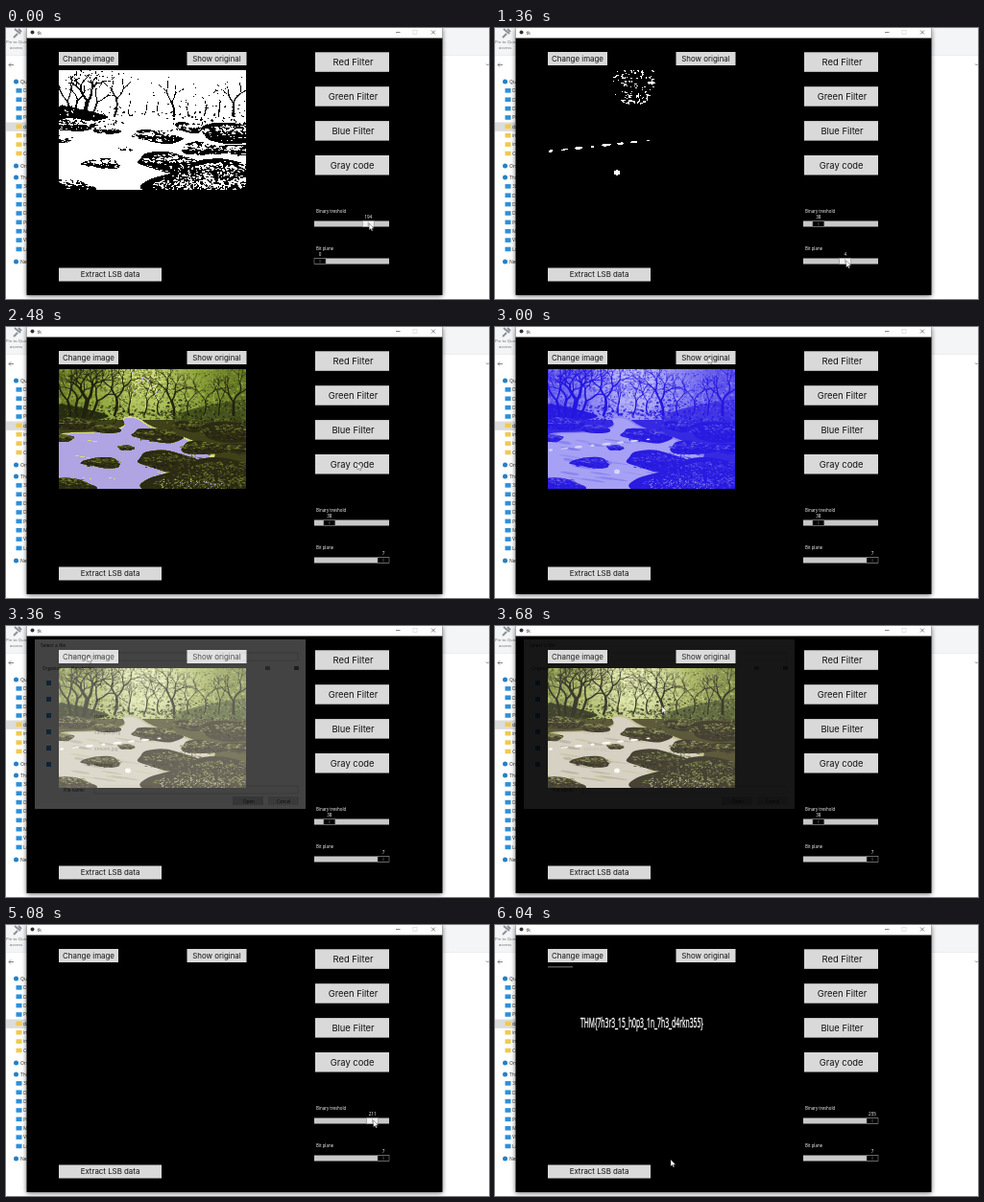
Animation, 503 px wide and 283 px high, one loop 6080 ms. Source, as an HTML page with a canvas:

```html
<!DOCTYPE html>
<html lang="en">
<head>
<meta charset="utf-8">
<title>Image filter tool</title>
<style>
  html, body { margin: 0; width: 503px; height: 283px; overflow: hidden; background: #fff; }
  svg, canvas { position: absolute; left: 0; top: 0; }
  canvas { left: 55px; top: 44px; }
  text { font-family: "Open Sans", "Noto Sans", sans-serif; }
  .window { filter: drop-shadow(0 1px 2.5px #0009); }
  .btn { font-family: Inter, sans-serif; fill: #111; text-anchor: middle; }
  .small { font-size: 4.4px; fill: #fff; }
  .value { font-size: 4.6px; fill: #fff; text-anchor: middle; }
</style>
</head>
<body>
<svg id="ui" width="503" height="283"></svg>
<canvas id="photo" width="195" height="125"></canvas>
<svg id="top" width="503" height="283"></svg>
<script>
const LOOP = 6080, W = 195, H = 125;
const $ = id => document.getElementById(id);
const clamp = v => Math.min(1, Math.max(0, v));
const lerp = (a, b, k) => a + (b - a) * k;

// ---- Window and controls ----
const rect = (x, y, w, h, fill, more = "") =>
  `<rect x="${x}" y="${y}" width="${w}" height="${h}" fill="${fill}" ${more}/>`;
const box = (x, y, w, h) => rect(x, y, w, h, "none", 'stroke="#bbb" stroke-width=".6"');
const label = (x, y, size, str, fill = "#222") =>
  `<text x="${x}" y="${y}" font-size="${size}" fill="${fill}">${str}</text>`;
const button = (x, y, w, h, size, str, shift = 0) => rect(x, y, w, h, "#d9d9d9") +
  `<text class="btn" x="${x + w / 2 + shift}" y="${y + h / 2 + size * .35}" font-size="${size}">${str}</text>`;

const ROW = 9.37;
function sidebar() {
  const places = ["Desktop", "Downloads", "Documents", "Pictures"];
  const groups = [
    [56, "Quick", [...places, "data", "images", "input", "Code"]],
    [144, "Online", []],
    [156, "This", ["3D", ...places, "Music", "Videos", "Local"]],
    [244, "Network", []]
  ];
  const item = (y, str) =>
    rect(10.5, y - 2.3, 6, 4.6, /^[a-zC]/.test(str) ? "#f0c94f" : "#2f8fd8") + label(18, y + 1.8, 5, str);
  return rect(0, 98.5, 21, ROW, "#dcdcdc") + groups.map(([y, head, items]) =>
    `<circle cx="10.5" cy="${y}" r="2.5" fill="#2580c4"/>` + label(15, y + 1.8, 5, head) +
    items.map((s, i) => item(y + ROW * (i + 1), s)).join("")).join("");
}

function slider(id, y, name) {
  return `<text class="small" x="323" y="${y - 12}">${name}</text>` +
    rect(321, y - 3, 78, 6, "#c8c8c8") +
    `<g id="${id}"><rect x="-6" y="${y - 3}" width="12" height="6" stroke="#8a8a8a" stroke-width=".6"/>
    <path d="M0 ${y - 2}v4" stroke="#777" stroke-width=".6"/>
    <text class="value" y="${y - 5.2}"></text></g>`;
}

$("ui").innerHTML =
  rect(0, 0, 503, 28, "#f4f5f6") + rect(0, 28, 503, .6, "#e2e2e2") +
  `<path d="M9 1l6 5M13 1l3 3M12 6l-4 4" stroke="#8b9299" stroke-width="2"/>` +
  label(0, 16.3, 4.3, "Pin to Quick", "#666") + label(4, 21.5, 4.3, "access", "#666") +
  `<path d="M8 38.5H3M5 36.5l-2 2 2 2M500 37.5l1.5 1.5 1.5-1.5" fill="none" stroke="#555" stroke-width=".7"/>` +
  sidebar() +
  `<g class="window">${rect(21.5, 0, 433, 279, "#000")}</g>` + rect(21.5, 0, 433, 10.5, "#fff") +
  `<circle cx="27.5" cy="4.5" r="2" fill="#333"/>` + label(32.5, 6.5, 4.8, "tk") +
  `<path d="M406 4.5h4.5M443 2.5l4 4M447 2.5l-4 4" stroke="#333" stroke-width=".6"/>
   <rect x="424" y="2.5" width="4" height="4" fill="none" stroke="#d0d0d0" stroke-width=".6"/>` +
  button(55, 25, 62, 14, 7.9, "Change image") + button(188.5, 25, 62, 14, 7.9, "Show original") +
  button(55, 250.5, 107, 14, 7.9, "Extract LSB data") +
  ["Red Filter", "Green Filter", "Blue Filter", "Gray code"]
    .map((s, i) => button(322, 25.3 + i * 35.9, 77, 20.5, 9.4, s, i < 3 ? 1 : .2)).join("") +
  slider("thr", 204.5, "Binary treshold") + slider("bit", 243.5, "Bit plane");

const files = ["dark.png", "forest.png", "river.png", "sample.png", "stream.jpg", "test.png"];
$("top").innerHTML =
  `<g id="flag">${rect(55, 43.4, 26, .9, "#8c8c8c")}
   <text transform="translate(89 106.5) scale(.485 1)" font-size="14" fill="#fff"
     stroke="#fff" stroke-width=".4">THM{7h3r3_15_h0p3_1n_7h3_d4rkn355}</text></g>` +
  `<g id="dialog">${rect(30, 14, 282, 177, "#fff")}${label(36, 22, 5, "Select a file")}
   ${box(62, 28, 150, 8)}${label(66, 34, 4.6, "This PC &#8250; Pictures")}${box(220, 28, 84, 8)}
   ${label(38, 46, 4.6, "Organize")}${label(68, 46, 4.6, "New folder")}
   ${rect(300, 42, 5, 4, "#777")}${rect(270, 42, 5, 4, "#999")}
   ${files.map((s, i) => rect(42, 57 + i * 17, 5, 5, "#2f8fd8") + label(92, 62 + i * 17, 5, s)).join("")}
   ${label(60, 173, 4.6, "File name:")}${box(92, 167, 212, 8)}
   ${rect(236, 178, 32, 9, "#ccc")}${label(247, 184.5, 4.6, "Open")}
   ${rect(273, 178, 32, 9, "#ddd")}${label(282, 184.5, 4.6, "Cancel")}</g>` +
  `<path id="cursor" d="M0 0V7L1.6 5.6 2.7 8 3.8 7.5 2.7 5.2H5Z" fill="#fff" stroke="#333" stroke-width=".4"/>`;

// ---- Forest stream scene ----
let seed = 7;
function rnd(a = 0, b = 1) {
  seed = (seed * 1664525 + 1013904223) >>> 0;
  return lerp(a, b, seed / 4294967296);
}

function paintScene(c) {
  const oval = (x, y, rx, ry, fill, tilt = 0) => {
    c.fillStyle = fill;
    c.beginPath();
    c.ellipse(x, y, rx, ry, tilt, 0, 7);
    c.fill();
  };
  // Closed curve through the middles of the given points
  const shape = (pts, fill) => {
    const n = pts.length;
    const mid = i => pts[i % n].map((v, j) => (v + pts[(i + 1) % n][j]) / 2);
    c.beginPath();
    c.moveTo(...mid(0));
    for (let i = 1; i <= n; i++) c.quadraticCurveTo(...pts[i % n], ...mid(i));
    c.fillStyle = fill;
    c.fill();
  };
  const specks = (n, x0, y0, x1, y1, size, fills) => {
    for (let i = 0; i < n; i++)
      oval(rnd(x0, x1), rnd(y0, y1), rnd(.4, size), rnd(.3, size * .6), fills[i % fills.length], rnd(-.8, .8));
  };
  const branch = (x, y, angle, len, width) => {
    if (width < .3) return;
    const bend = angle + rnd(-.5, .5);
    const nx = x + Math.cos(angle) * len, ny = y + Math.sin(angle) * len;
    c.lineWidth = width;
    c.beginPath();
    c.moveTo(x, y);
    c.quadraticCurveTo(x + Math.cos(bend) * len * .5, y + Math.sin(bend) * len * .5, nx, ny);
    c.stroke();
    branch(nx, ny, angle + rnd(.1, .8), len * rnd(.6, .9), width * .66);
    branch(nx, ny, angle - rnd(.1, .8), len * rnd(.6, .9), width * .66);
  };

  // Woods with light in the middle
  const woods = c.createRadialGradient(90, 12, 4, 92, 20, 115);
  woods.addColorStop(0, "#f3f5c4");
  woods.addColorStop(.2, "#d9dfa0");
  woods.addColorStop(.5, "#a3b057");
  woods.addColorStop(1, "#66742f");
  c.fillStyle = woods;
  c.fillRect(0, 0, W, H);
  specks(1500, 0, 0, W, 50, 2, ["#8fa04a88", "#c3cc7f88", "#6c7f3488", "#dde2a077"]);
  specks(500, 55, 0, 135, 30, 1.6, ["#a3ae6088", "#c6cc8a99", "#7a8a4499"]);
  specks(420, 0, 0, W, 48, 1.1, ["#3a421ecc", "#4c5827cc"]);

  // Banks
  shape([[-20, 34], [14, 38], [35, 43], [62, 51], [-20, 60]], "#2f3319");
  shape([[112, 50], [150, 38], [215, 28], [215, 66], [130, 58]], "#566030");
  c.fillStyle = "#4d4a28";
  c.fillRect(0, 53, W, H);
  specks(380, 112, 32, W, 64, 1.8, ["#2c3018", "#7d884a", "#424b24"]);
  specks(200, 0, 36, 70, 58, 1.5, ["#2b2c18", "#59623299", "#353a1e"]);
  specks(90, 58, 42, 120, 52, 2, ["#33361c", "#6d783c"]);

  // Trees
  c.strokeStyle = "#29261a";
  c.lineCap = "round";
  for (let i = 0; i < 4; i++) branch(12 + i * 7, 49, -1.75 + i * .2, 17, i === 2 ? 4.5 : 2.4);
  for (let i = 0; i < 9; i++) branch(58 + i * 15.5, 48, -1.55 + rnd(-.2, .2), rnd(13, 19), i % 4 ? 1.3 : 2.6);

  // Stream
  const water = [[64, 49], [82, 49], [95, 60], [130, 70], [168, 87], [154, 99], [106, 108],
    [98, 130], [24, 130], [-12, 112], [-12, 66], [40, 66], [72, 60]];
  shape(water, "#bebc84");
  shape(water.map(([x, y]) => [lerp(75, x, .94), lerp(90, y, .95)]), "#d2cdbc");
  for (let i = 0; i < 26; i++)
    oval(rnd(5, 125), rnd(70, 118), rnd(5, 16), rnd(.4, 1.6), i % 2 ? "#bebc84aa" : "#a9a592aa", .15);

  // Stones: x, y, half width
  const stones = [
    [14, 57, 24], [48, 62, 15], [100, 69, 25], [140, 60, 20], [178, 66, 32], [150, 83, 25], [192, 84, 22],
    [3, 72, 13], [46, 98, 20], [70, 82, 9], [118, 97, 36], [174, 104, 34], [10, 121, 26], [150, 122, 56]
  ];
  for (const [x, y, rx] of stones) {
    const ry = rx * .28, n = 11;
    const pts = Array.from({ length: n }, (_, i) => {
      const a = i * Math.PI * 2 / n, r = rnd(.8, 1.35);
      return [x + Math.cos(a) * rx * r, y + Math.sin(a) * ry * r + Math.cos(a) * rx * .07];
    });
    shape(pts, "#353020");
    for (let i = 0; i < rx * 5; i++) {
      const a = rnd(0, 6.28), r = Math.sqrt(rnd()) * .95;
      const up = Math.sin(a) < 0;
      const fills = up ? ["#77793d", "#585a2e", "#8b8f50"] : ["#27231a", "#413a22", "#555030"];
      oval(x + Math.cos(a) * rx * r, y + Math.sin(a) * ry * r, rnd(.5, 2.2), rnd(.3, .7), fills[i % 3], .15);
    }
  }
  specks(300, 125, 100, W, H, 1.2, ["#747a3c", "#2c281a", "#8b9052", "#3c3820"]);
  specks(90, 105, 115, 170, H, .7, ["#f1efcc"]);

  // Foam along the falls
  for (let i = 0; i < 8; i++) oval(3 + i * 14.5, 84.5 - i * 1.6, rnd(2, 5), rnd(.7, 1.4), "#fbfaf2", -.1);
  oval(72, 107, 3, 2.5, "#fbfaf2");
}

const ctx = $("photo").getContext("2d", { willReadFrequently: true });
paintScene(ctx);
const base = ctx.getImageData(0, 0, W, H).data;

const mono = on => on ? [255, 255, 255] : [0, 0, 0];
const tint = l => {
  const k = (l / 255) ** 1.5;
  return [25 + 195 * k, 10 + 210 * k, 222 + 30 * k];
};
const LOOKS = {
  binary: (r, g, b, l, thr) => mono(l > 255 - thr),
  plane: (r, g, b, l, n) => mono(l >> n & 1),
  gray: (r, g, b, l) => l > 145 && g - b < 42 ? [176, 164, 226]
    : l > 170 && g - b < 58 ? [214, 218, 132] : [r * .82, g * .88, b * .6],
  red: (r, g, b, l) => tint(l).reverse(),
  green: (r, g, b, l) => { const [x, y, z] = tint(l); return [x, z, y]; },
  blue: (r, g, b, l) => tint(l),
  plain: (r, g, b) => [r, g, b],
  dark: () => mono(false)
};

let shown = "";
function showPhoto(look, arg) {
  const key = look + arg;
  if (key === shown) return;
  shown = key;
  const out = ctx.createImageData(W, H);
  for (let i = 0; i < base.length; i += 4) {
    const r = base[i], g = base[i + 1], b = base[i + 2];
    const l = Math.round(r * .3 + g * .59 + b * .11);
    out.data.set(LOOKS[look](r, g, b, l, arg), i);
    out.data[i + 3] = 255;
  }
  ctx.putImageData(out, 0, 0);
}

// ---- Timeline ----
// Value at time t from [time, value] pairs, linear between them
function track(keys, t) {
  const i = keys.findIndex(k => k[0] > t);
  if (i < 0) return keys[keys.length - 1][1];
  if (i === 0) return keys[0][1];
  const [t0, a] = keys[i - 1], [t1, b] = keys[i];
  return lerp(a, b, (t - t0) / (t1 - t0));
}
const threshold = t => Math.round(track([[0, 194], [440, 38], [4060, 38], [4240, 128], [4400, 128], [5440, 255]], t));
const plane = t => Math.round(track([[760, 0], [1240, 4], [1900, 5], [2080, 7]], t));
const knob = (value, max) => 327 + 66 * value / max;

const SPOTS = {
  thr: t => [knob(threshold(t), 255) + 1, 204],
  bit: t => [knob(plane(t), 7) + 1, 243],
  red: () => [367, 36],
  green: () => [367, 72],
  blue: () => [367, 108],
  gray: () => [366, 142],
  show: () => [222, 31],
  change: () => [85, 31],
  file: () => [174, 84],
  extract: () => [183, 245]
};

// Where the pointer rests: from, until, spot
const STOPS = [
  [0, 480, "thr"], [720, 2160, "bit"], [2360, 2520, "gray"], [2600, 2660, "red"], [2720, 2780, "green"],
  [2840, 2880, "blue"], [2980, 3140, "show"], [3300, 3380, "change"], [3560, 3760, "file"],
  [4060, 5960, "thr"], [6040, LOOP, "extract"]
];
function pointer(t) {
  const i = STOPS.findIndex(s => t <= s[1]);
  const [from, , name] = STOPS[i];
  if (t >= from) return { name, at: SPOTS[name](t) };
  const [, left, last] = STOPS[i - 1];
  const a = SPOTS[last](left), b = SPOTS[name](from), k = (t - left) / (from - left);
  return { name: "", at: a.map((v, j) => lerp(v, b[j], k)) };
}

// Look of the photo until each time
const STEPS = [[1400, "binary"], [2400, "plane"], [2600, "gray"], [2720, "red"], [2840, "green"],
  [3120, "blue"], [3740, "plain"], [LOOP, "dark"]];

function setSlider(id, value, max, active) {
  const g = $(id);
  g.setAttribute("transform", `translate(${knob(value, max)} 0)`);
  g.firstChild.setAttribute("fill", active ? "#f2f2f2" : "#000");
  g.lastElementChild.textContent = value;
}

function draw(t) {
  const thr = threshold(t), bit = plane(t), { name, at } = pointer(t);
  setSlider("thr", thr, 255, name === "thr");
  setSlider("bit", bit, 7, name === "bit");

  const look = STEPS.find(s => t < s[0])[1];
  showPhoto(look, look === "binary" ? thr : look === "plane" ? bit : 0);
  $("flag").style.display = look === "dark" && thr >= 254 ? "" : "none";
  $("dialog").style.opacity = Math.min(clamp((t - 3340) / 80), clamp((3690 - t) / 100));
  $("cursor").setAttribute("transform", `translate(${at.join(" ")})`);
}

const start = performance.now();
function tick() {
  draw((performance.now() - start) % LOOP);
  requestAnimationFrame(tick);
}
tick();
</script>
</body>
</html>
```
